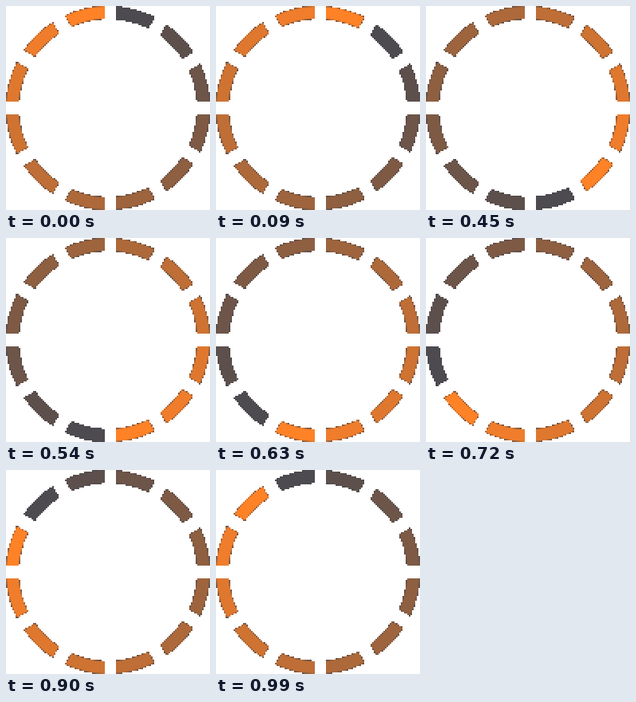
Write an HTML page with a canvas that moves like this. It is 256 by 256 pixels and loops after 1080 ms.

```html
<!DOCTYPE html>
<html lang="en">
<head>
<meta charset="utf-8">
<title>Ring spinner</title>
<style>
  html, body { margin: 0; width: 100%; height: 100%; overflow: hidden; background: #fff; }
  canvas { display: block; width: 256px; height: 256px; image-rendering: pixelated; }
</style>
</head>
<body>
<canvas id="stage" width="128" height="128"></canvas>
<script>
// Drawn at half size with hard pixels, shown at double size.
const SIZE = 128, COUNT = 12, STEP_MS = 90;
const ctx = document.getElementById('stage').getContext('2d', { willReadFrequently: true });
const CENTER = 64, OUTER = 64, INNER = 56;
const HUB_X = 65.5; // the gaps meet slightly right of the ring's center
const DARK = [77, 75, 80], BRIGHT = [255, 130, 39];
const MIN_COVER = 0.22;

const halfGap = spoke => spoke % 6 === 0 ? 3.5 : spoke % 3 === 0 ? 4 : 4.4;

// Canvas angle where a line parallel to a spoke, shifted clockwise, meets a circle.
function edgeAngle(spoke, shift, radius) {
  const a = (spoke / COUNT) * 2 * Math.PI - Math.PI / 2;
  const dx = Math.cos(a), dy = Math.sin(a);
  const px = HUB_X - CENTER - dy * shift, py = dx * shift;
  const along = px * dx + py * dy;
  const t = -along + Math.sqrt(along * along + radius * radius - px * px - py * py);
  return Math.atan2(py + dy * t, px + dx * t);
}

function segmentPath(i) {
  const from = halfGap(i), to = -halfGap(i + 1);
  const path = new Path2D();
  path.arc(CENTER, CENTER, OUTER, edgeAngle(i, from, OUTER), edgeAngle(i + 1, to, OUTER));
  path.arc(CENTER, CENTER, INNER, edgeAngle(i + 1, to, INNER), edgeAngle(i, from, INNER), true);
  path.closePath();
  return path;
}

const segments = Array.from({ length: COUNT }, (_, i) => segmentPath(i));

function shade(k) {
  const mix = DARK.map((v, c) => Math.round(v + (BRIGHT[c] - v) * k / (COUNT - 1)));
  return `rgb(${mix})`;
}

// Makes soft edge pixels opaque, blended with the dark tone.
function hardenEdges() {
  const image = ctx.getImageData(0, 0, SIZE, SIZE);
  const px = image.data;
  for (let p = 0; p < px.length; p += 4) {
    const cover = px[p + 3] / 255;
    for (let c = 0; c < 3; c++) px[p + c] = DARK[c] + (px[p + c] - DARK[c]) * cover;
    px[p + 3] = cover < MIN_COVER ? 0 : 255;
  }
  ctx.putImageData(image, 0, 0);
}

function draw(step) {
  ctx.clearRect(0, 0, SIZE, SIZE);
  segments.forEach((path, i) => {
    ctx.fillStyle = shade((i - step + COUNT) % COUNT);
    ctx.fill(path);
  });
  hardenEdges();
}

const start = performance.now();
let shown = -1;
function frame() {
  const step = Math.floor((performance.now() - start) / STEP_MS) % COUNT;
  if (step !== shown) draw(shown = step);
  requestAnimationFrame(frame);
}
frame();
</script>
</body>
</html>
```
